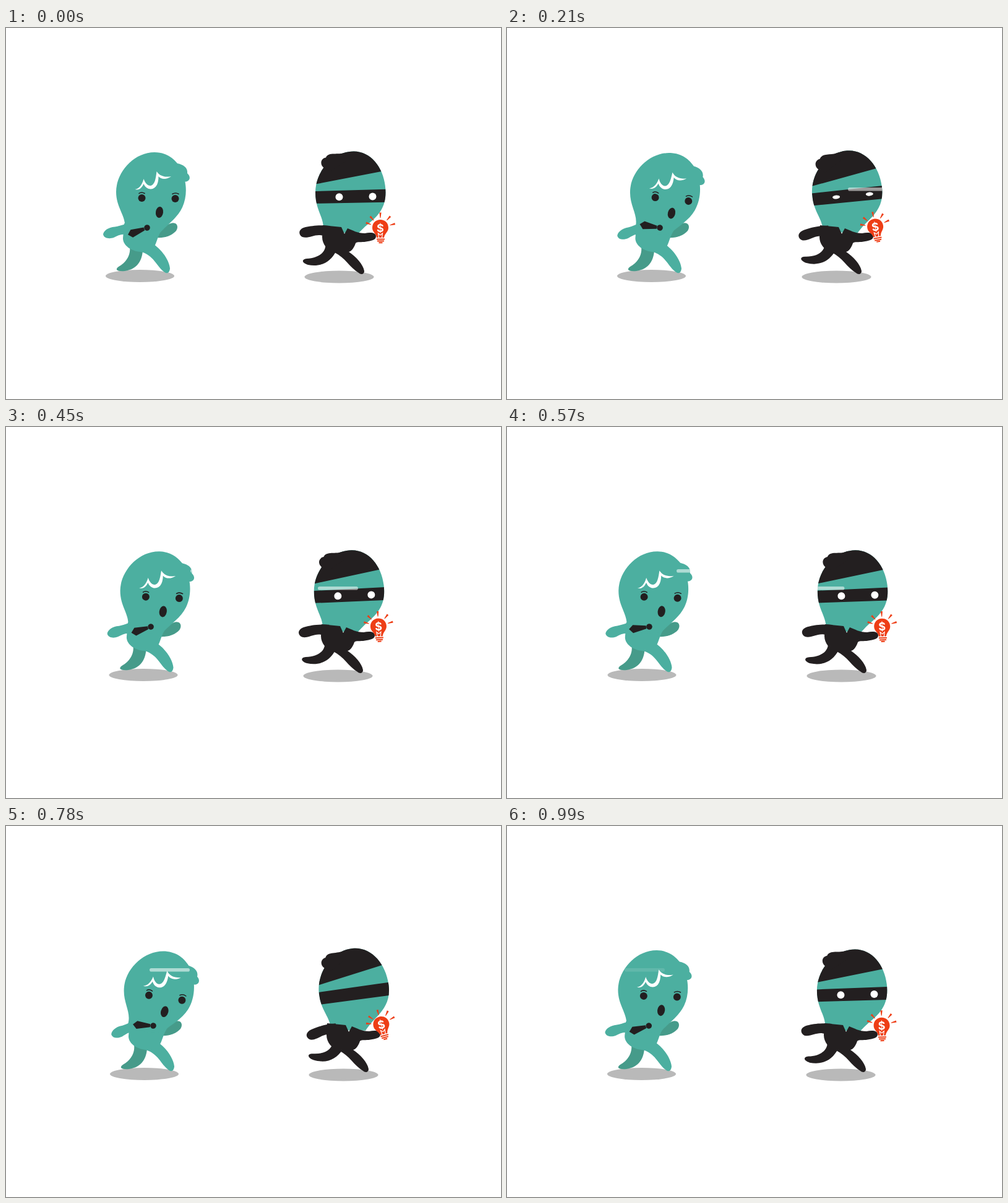
Write an HTML page that moves like this. It is 800 by 600 pixels and loops after 1.02 s.

```html
<!DOCTYPE html>
<html lang="en">
<head>
<meta charset="utf-8">
<title>Idea chase</title>
<style>
  html, body { margin: 0; width: 100%; height: 100%; overflow: hidden; background: #fff; }
  svg { display: block; width: 100vw; height: 100vh; }
  .teal { fill: #4cafa0; }
  .deep { fill: #469b8a; }
  .ink { fill: #231f20; }
  .red { fill: #ee3e16; }
  .shade { fill: #b9b9b9; }
  .brow { fill: none; stroke: #231f20; stroke-width: 1.5; stroke-linecap: round; }
</style>
</head>
<body>
<svg viewBox="0 0 800 600">
  <defs>
    <path id="ownerShape" d="M240 201C260 201 271 212 277 219C287 221 294 226 293 235C299 240 298 248 289.500 248.500C292 262 291 277 285 290C277 307 262 317 250 330Q222 342 192 325C195 304 178 292 178 265C178 234 206 201 240 201Z"/>
    <path id="thiefShape" d="M562 199.600C592 199.600 613.500 230 613.500 266C613.500 289 603 302 590 313C580 321 574 327 568 334L513 327C514 305 500 295 500 266C500 232 528 199.600 562 199.600Z"/>
    <clipPath id="ownerClip"><use id="ownerMask" href="#ownerShape"/></clipPath>
    <clipPath id="thiefClip"><use id="thiefMask" href="#thiefShape"/></clipPath>
    <clipPath id="thiefFace"><use href="#thiefShape"/></clipPath>
  </defs>

  <g id="owner">
    <ellipse class="shade" cx="216.5" cy="401" rx="55.5" ry="10"/>
    <path class="deep" d="M200 354C202 368 193 380 182 386C175 391 180 394 192 393C213 390 220 375 221 360Z"/>
    <path class="deep" d="M243 339C256 340 268 336 275 328C280 320 275 313 266 316C257 320 253 322 244 327Z"/>
    <path class="teal" d="M236 348C252 358 264 376 265 389C264 397 260 398 255 394C242 384 240 368 216 361Z"/>
    <path id="ownerArm" class="teal" d="M206 316C192 315 185 321 172 322C162 324 157 330 157 334C159 341 168 341 174 339C182 335 188 332 196 335L206 335Z"/>
    <path id="ownerBody" class="teal" d="M191 316L253 325C245 336 244 346 240 353C234 361 226 363 217 362C203 361 189 352 189 340Z"/>
    <g id="ownerHead">
      <use href="#ownerShape" class="teal"/>
      <path fill="#fff" d="M208.500 261C215 260 220 254 222.500 244C225 251 229 255.500 234 255C241 253 242 243 243.500 232C248 239 256 242 267 240C259 245.500 251 245 246.500 240C246.500 252 242.500 260 234 260.500C228 260.500 224 256 222.500 252C219 260 214 262.500 208.500 261Z"/>
      <circle class="ink" cx="219.5" cy="275" r="6"/>
      <circle class="ink" cx="273.5" cy="276" r="6"/>
      <path class="brow" d="M215 267.500Q219 264.500 224 267.500M269 268.500Q274 265.500 279 268.500"/>
      <ellipse class="ink" cx="248" cy="298" rx="6" ry="9" transform="rotate(8 248 298)"/>
    </g>
    <g id="tie" class="ink">
      <circle r="4.8"/>
      <path d="M-5 -2.500L-26 -6.500L-33 -0.500L-27 6.500L-5 2.500Z"/>
    </g>
  </g>
  <g clip-path="url(#ownerClip)">
    <rect id="ownerGlint" y="230" width="65" height="5.600" rx="2.8" fill="#fff"/>
  </g>

  <g id="thief">
    <ellipse class="shade" cx="538.5" cy="402.5" rx="56" ry="10"/>
    <g id="thiefHead">
      <use href="#thiefShape" class="teal"/>
      <g class="ink" clip-path="url(#thiefFace)">
        <path d="M480 190H640V225.500L490 254.500Z"/>
        <path d="M490 264.300L625 260.300V281.500L490 284Z"/>
      </g>
      <path class="ink" d="M548 201.500C537 206 521 199.500 517 209.500C508 211 506.500 222 515 227L524 232L550 215Z"/>
      <g id="eyes" fill="#fff">
        <ellipse cx="538.5" cy="273.2" rx="6"/>
        <ellipse cx="592.5" cy="272.5" rx="6"/>
      </g>
    </g>
    <path id="thiefLeg" class="ink" d="M516 346C519 362 506 372 486 373C477 374 478 380 488 383C510 387 525 378 534 360Z"/>
    <path id="thiefArm" class="ink" d="M524 320C505 318 494 320 484 322C472 325 472 334 479 338C488 341 497 334 508 335L524 338Z"/>
    <path class="ink" d="M512 319L542 322L547 333L552 324C560 327 568 332 580 332C590 330 598 331 598 337C598 343 590 344 582 345.500C574 347 568 345 565 348C562 357 558 361 554 362C566 370 577 382 579 393C579 399 573 399 570 396C556 388 548 371 531 363C520 360 511 350 511 338Z"/>
    <g id="bulb">
      <g id="rays" class="red" transform="translate(605 323)"></g>
      <path class="red" d="M592 323C592 315 598 310 605 310C612 310 618 315 618 323C618 330 612 332 611 339H599C598 332 592 330 592 323Z"/>
      <path d="M602.500 339.500L601.500 332L605 335L608.500 332L607.500 339.500" fill="none" stroke="#fff" stroke-width="1.2"/>
      <text x="605" y="329.500" text-anchor="middle" fill="#fff" font-family="Inter, Arial, sans-serif" font-weight="700" font-size="18">$</text>
      <path d="M599 341.500H612M600 344.600H611M602.500 347.300H608.500" stroke="#ee3e16" stroke-width="2"/>
    </g>
  </g>
  <g clip-path="url(#thiefClip)">
    <rect id="thiefGlint" y="258" width="65" height="5.600" rx="2.8" fill="#fff"/>
  </g>
</svg>
<script>
const LOOP = 1020, STEP = 30;
const $ = id => document.getElementById(id);
const set = (id, name, value) => $(id).setAttribute(name, value);
const move = (id, value) => set(id, 'transform', value);
const clamp = v => Math.max(0, Math.min(1, v));

// Shared key times and the value of each track at them
const times = [0, 105, 210, 270, 330, 450, 570, 675, 780, 885, 990, 1020];
const tracks = {
  owner: [0, 6.2, 17, 18.8, 16.5, 5.5, 1.5, 3.8, 7, 3.7, 1, 0.6],
  thief: [0, -2.4, -6, -6.6, -6, -2, 2, 4.7, 7, 4, 1, 0.7],
  lean: [0, 0.26, 0.7, 0.78, 0.68, 0.2, 0.14, 0.52, 1, 0.5, 0.08, 0.05],
  tie: [-21, -6, 9, 4, -6, -18, -8, 0, 3, -7, -18, -20]
};

// Smooth Hermite curve through a track
function sample(track, t) {
  const last = times.length - 1;
  let i = 0;
  while (i < last - 1 && t >= times[i + 1]) i++;
  const slope = k => k === 0 || k === last ? 0 :
    (track[k + 1] - track[k - 1]) / (times[k + 1] - times[k - 1]);
  const span = times[i + 1] - times[i];
  const u = (t - times[i]) / span, v = 1 - u;
  return track[i] * (1 + 2 * u) * v * v + track[i + 1] * (3 - 2 * u) * u * u +
    span * u * v * (slope(i) * v - slope(i + 1) * u);
}

$('rays').innerHTML = [-161, -132, -90, -49, -15].map(a =>
  `<path d="M16 -.5L24.500 -1.600V1.600L16 .5Z" transform="rotate(${a})"/>`).join('');

function draw(t) {
  const lean = sample(tracks.lean, t);
  const ownerX = sample(tracks.owner, t), thiefX = sample(tracks.thief, t);
  const ownerTilt = `rotate(${7.4 * lean} 231 309)`;
  const thiefTilt = `rotate(${-6.5 * lean} 543 279)`;

  move('owner', `translate(${ownerX} 0)`);
  move('ownerHead', ownerTilt);
  move('ownerMask', `translate(${ownerX} 0) ${ownerTilt}`);
  move('ownerBody', `translate(${2 * lean} 0)`);
  move('ownerArm', `translate(${4.5 * lean} ${-2 * lean}) rotate(${-7 * lean} 203 322)`);
  move('tie', `translate(${228 + 3 * lean} 323) rotate(${sample(tracks.tie, t)})`);

  move('thief', `translate(${thiefX} 0)`);
  move('thiefHead', thiefTilt);
  move('thiefMask', `translate(${thiefX} 0) ${thiefTilt}`);
  move('thiefLeg', `translate(${3.5 * lean} 0) rotate(${6.5 * lean} 528 362)`);
  move('thiefArm', `translate(${2.5 * lean} 0) rotate(${-11 * lean} 520 324)`);
  move('bulb', `rotate(${-15 * lean} 595 343)`);
  for (const eye of $('eyes').children) eye.setAttribute('ry', Math.min(6, 10 * (1 - lean)));

  set('ownerGlint', 'x', 232 - (t - 780) * 0.2);
  set('ownerGlint', 'opacity', 0.55 * clamp((1020 - t) / 140));
  set('thiefGlint', 'x', 551 - (t - 210) * 0.196);
  set('thiefGlint', 'opacity', 0.55 * clamp(t / 120));
}

function tick() {
  draw(Math.floor(performance.now() % LOOP / STEP) * STEP);
  requestAnimationFrame(tick);
}
tick();
</script>
</body>
</html>
```
